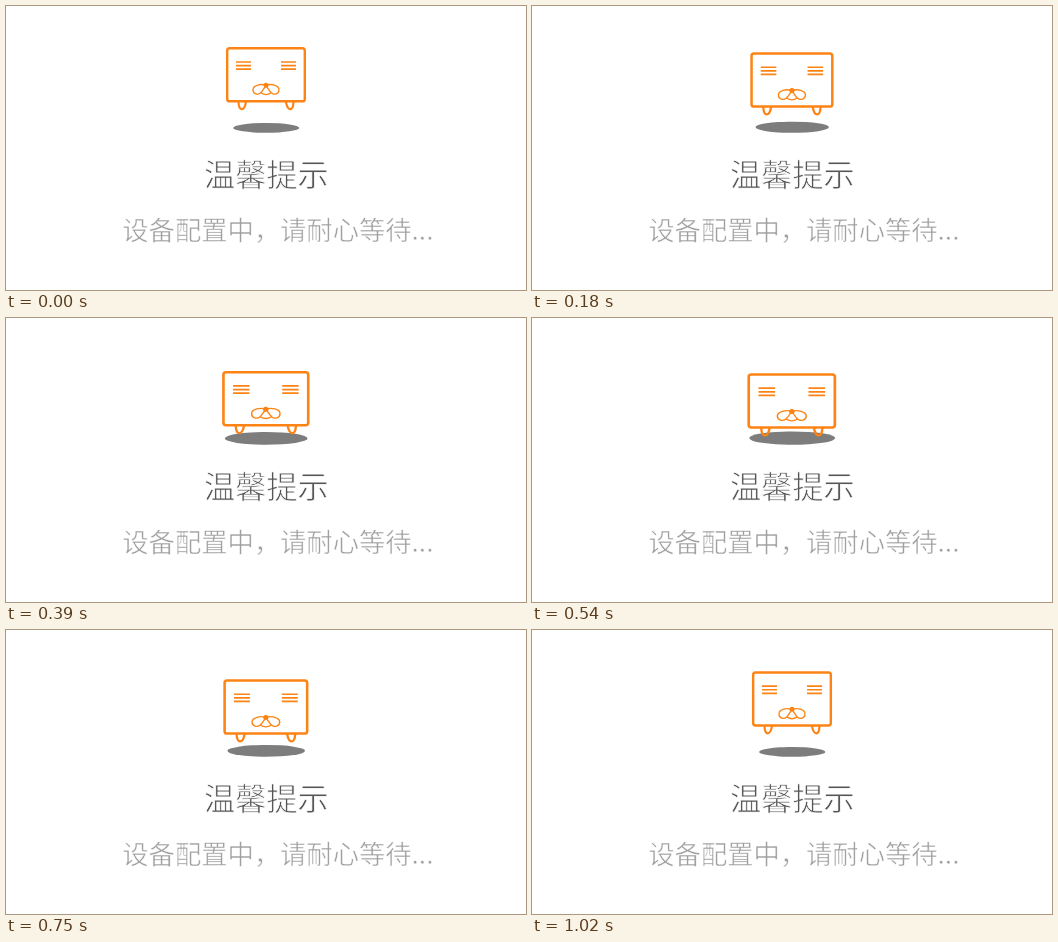
Write an HTML page that moves like this. It is 520 px wide and 284 px high and loops after 1.12 s.

```html
<!DOCTYPE html>
<html lang="zh-CN">
<head>
<meta charset="utf-8">
<style>
  html, body { margin: 0; width: 100%; height: 100%; overflow: hidden; background: #fff; }
  svg { display: block; width: 520px; height: 284px; }
  /* the white outline thins the regular weight to a light one */
  text { font-family: "Noto Sans CJK SC", "Noto Sans CJK", sans-serif; font-weight: 300; stroke: #fff; }
  .line { fill: none; stroke: #fd8414; stroke-linecap: round; stroke-linejoin: round; }
</style>
</head>
<body>
<svg viewBox="0 0 520 284">
  <defs>
    <!-- right half, x measured from the middle -->
    <g id="half" class="line">
      <path stroke-width="1.7" stroke-linecap="butt" d="M15 15H30M15 18.6H30M15 22.2H30"/>
      <path stroke-width="1.3" d="M0 38.5C5 36.2 13 38.2 13 42.8C13 47.4 8 48.2 5.3 45.8C3.5 44 1.8 41 0 38.5"/>
      <path stroke-width="2.2" d="M20 55C20.8 59.5 22.5 62.2 24.3 62.2C26.2 62.2 27.3 59.5 27.5 55"/>
    </g>
  </defs>
  <ellipse id="shadow" fill="#7d7d7d"/>
  <g id="tv">
    <use href="#half"/>
    <use href="#half" transform="scale(-1 1)"/>
    <rect class="line" x="-38.8" y="1.3" width="77.6" height="53" rx="2.4" stroke-width="2.4"/>
    <path class="line" stroke-width="1.3" d="M-4.8 46Q0 49.2 4.8 46"/>
    <circle cy="38.2" r="2.5" fill="#fd8414"/>
  </g>
  <text x="198" y="179.8" font-size="31.2" fill="#555" stroke-width=".8">温馨提示</text>
  <text x="116.3" y="234.3" font-size="26.3" fill="#a0a0a0" stroke-width=".55">设备配置中，请耐心等待...</text>
</svg>
<script>
  const LOOP = 1120, STEP = 30;
  // time in ms, drop amount
  const poses = [[0, 0], [180, .37], [390, .84], [540, 1], [660, .77], [840, .39], [1020, .01]];
  const shadow = document.getElementById('shadow');
  const tv = document.getElementById('tv');

  function dropAt(ms) {
    const t = Math.min(1020, Math.floor(ms / STEP) * STEP);
    const i = Math.max(1, poses.findIndex(p => p[0] >= t));
    const [t0, d0] = poses[i - 1], [t1, d1] = poses[i];
    return d0 + (d1 - d0) * (t - t0) / (t1 - t0);
  }

  function draw(ms) {
    const d = dropAt(ms);
    tv.setAttribute('transform',
      `translate(${260 - .2 * d} ${41 + 14.2 * d}) scale(${1 + .11 * d} 1)`);
    const ry = 4.9 + 1.8 * d;
    shadow.setAttribute('cx', 260.2);
    shadow.setAttribute('cy', 126.8 - ry);
    shadow.setAttribute('rx', 33 + 10 * d);
    shadow.setAttribute('ry', ry);
  }

  const start = performance.now();
  function tick() {
    draw((performance.now() - start) % LOOP);
    requestAnimationFrame(tick);
  }
  tick();
</script>
</body>
</html>
```
